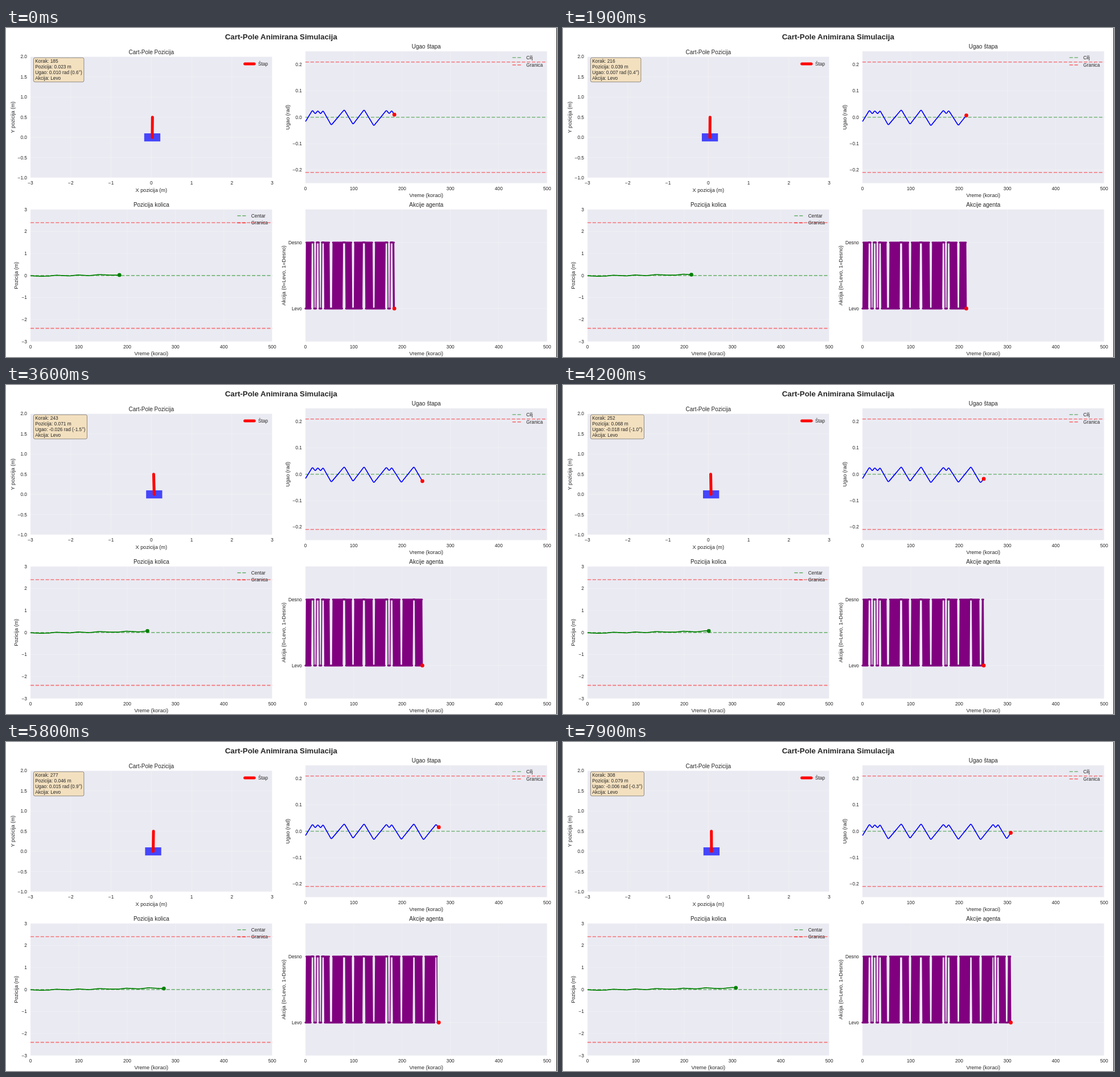
Recreate the animation shown at these times as an HTML page. Size 968x578 px, loop 8 s.

```html
<!DOCTYPE html>
<html lang="sr">
<head>
<meta charset="utf-8">
<title>Cart-Pole</title>
<style>
  html, body { margin: 0; width: 100%; height: 100%; overflow: hidden; background: #fff; }
  svg { display: block; font-family: "Liberation Sans", Arial, sans-serif; fill: #262626; }
</style>
</head>
<body>
<svg id="stage" width="968" height="578" viewBox="0 0 968 578"></svg>
<script>
const stage = document.getElementById('stage');
const LOOP = 8000, TICK = 100;
const TICK_FONT = 8.33, LABEL_FONT = 9.17, TITLE_FONT = 10, LINE = 1.67;

function add(tag, attrs, text) {
  const node = document.createElementNS('http://www.w3.org/2000/svg', tag);
  set(node, attrs);
  if (text !== undefined) node.textContent = text;
  return stage.appendChild(node);
}
function set(node, attrs) {
  for (const key in attrs) node.setAttribute(key, attrs[key]);
}
// y is the vertical middle of the text
function label(x, y, text, size = TICK_FONT, anchor = 'middle', extra = {}) {
  return add('text', { x, y: y + size * 0.36, 'font-size': size, 'text-anchor': anchor, ...extra }, text);
}
function line(x1, y1, x2, y2, stroke, width, extra = {}) {
  return add('line', { x1, y1, x2, y2, stroke, 'stroke-width': width, ...extra });
}
function dashed(x1, x2, y, color) {
  line(x1, y, x2, y, color, LINE, { 'stroke-opacity': 0.5, 'stroke-dasharray': '6.17 2.67' });
}
const curve = (stroke, width, extra = {}) =>
  add('path', { fill: 'none', stroke, 'stroke-width': width, 'stroke-linejoin': 'round', ...extra });
const dot = fill => add('circle', { r: 3.35, fill });

function axes(o) {
  const { left, top, bottom, xRange, yRange } = o, right = left + 424.6;
  const x = v => left + (v - xRange[0]) / (xRange[1] - xRange[0]) * (right - left);
  const y = v => bottom - (v - yRange[0]) / (yRange[1] - yRange[0]) * (bottom - top);
  const middle = (left + right) / 2;
  add('rect', { x: left, y: top, width: right - left, height: bottom - top, fill: '#eaeaf2' });
  const minus = s => String(s).replace('-', '\u2212');
  for (const v of o.xTicks) {
    line(x(v), top, x(v), bottom, '#fff', 0.83, { 'stroke-opacity': 0.3 });
    label(x(v), bottom + 9.3, minus(v));
  }
  for (const [v, name] of o.yTicks) {
    line(left, y(v), right, y(v), '#fff', 0.83, { 'stroke-opacity': 0.3 });
    label(left - 6, y(v), minus(name), TICK_FONT, 'end');
  }
  label(middle, top - 8.5, o.title, TITLE_FONT);
  label(middle, bottom + 21.2, o.xLabel, LABEL_FONT);
  const my = (top + bottom) / 2;
  label(o.yLabelX, my, o.yLabel, LABEL_FONT, 'middle', { transform: `rotate(-90 ${o.yLabelX} ${my})` });
  return { x, y, left, right };
}

function guides(ax, limit, name, x, rows) {
  dashed(ax.left, ax.right, ax.y(0), '#008000');
  dashed(ax.left, ax.right, ax.y(limit), '#f00');
  dashed(ax.left, ax.right, ax.y(-limit), '#f00');
  return () => [[name, '#008000'], ['Granica', '#f00']].forEach(([text, color], i) => {
    dashed(x, x + 16.7, rows[i], color);
    label(x + 24.4, rows[i], text, TICK_FONT, 'start');
  });
}

const range = (from, to, step, digits) => {
  const out = [];
  for (let v = from; v <= to + 1e-9; v += step) out.push([v, (Math.abs(v) < 1e-9 ? 0 : v).toFixed(digits)]);
  return out;
};
const steps = { xRange: [0, 500], xTicks: [0, 100, 200, 300, 400, 500], xLabel: 'Vreme (koraci)' };

label(483.3, 15.5, 'Cart-Pole Animirana Simulacija', 13.33, 'middle', { 'font-weight': 'bold' });
const scene = axes({ left: 43, top: 50.5, bottom: 263, xRange: [-3, 3], yRange: [-1, 2],
  xTicks: [-3, -2, -1, 0, 1, 2, 3], yTicks: range(-1, 2, 0.5, 1),
  title: 'Cart-Pole Pozicija', xLabel: 'X pozicija (m)', yLabel: 'Y pozicija (m)', yLabelX: 12 });
const anglePlot = axes({ ...steps, left: 526, top: 41, bottom: 272.5, yRange: [-0.25, 0.25],
  yTicks: range(-0.2, 0.2, 0.1, 1), title: 'Ugao štapa', yLabel: 'Ugao (rad)', yLabelX: 494.5 });
const cartPlot = axes({ ...steps, left: 43, top: 318.8, bottom: 550.8, yRange: [-3, 3],
  yTicks: range(-3, 3, 1, 0), title: 'Pozicija kolica', yLabel: 'Pozicija (m)', yLabelX: 18 });
const actionPlot = axes({ ...steps, left: 526, top: 318.8, bottom: 550.8, yRange: [-0.5, 1.5],
  yTicks: [[0, 'Levo'], [1, 'Desno']], title: 'Akcije agenta',
  yLabel: 'Akcija (0=Levo, 1=Desno)', yLabelX: 487.5 });

const cart = add('rect', { y: scene.y(0.1), width: 28.3, height: 14.17, fill: '#00f', 'fill-opacity': 0.7 });
const pole = line(0, scene.y(0), 0, 0, '#f00', 5, { 'stroke-linecap': 'round' });
line(419.6, 63, 436.2, 63, '#f00', 5, { 'stroke-linecap': 'round' });
label(443, 63, 'Štap', TICK_FONT, 'start');
const infoBox = add('rect', { x: 48.4, y: 52.2, height: 42.6, rx: 2.5, fill: '#f5deb3', 'fill-opacity': 0.8,
  stroke: '#000', 'stroke-opacity': 0.8, 'stroke-width': 0.5 });
const info = [58.5, 68.3, 78.1, 87.9].map(y => label(51.3, y, '', TICK_FONT, 'start'));

const angleLegend = guides(anglePlot, 0.2095, 'Cilj', 889.6, [52, 64.8]);
const angleLine = curve('#00f', LINE), angleDot = dot('#f00');
angleLegend();
const cartLegend = guides(cartPlot, 2.4, 'Centar', 406.4, [329.8, 342.4]);
const cartLine = curve('#008000', LINE), cartDot = dot('#008000');
cartLegend();
const actionLine = curve('#800080', LINE);
const actionDots = curve('#800080', 3.3, { 'stroke-linecap': 'round' });
const actionDot = dot('#f00');
add('rect', { x: 967, y: 0, width: 1, height: 578, fill: '#111' });

// Each turn: first step of a held push, pole angle and cart position at its peak.
// The pushes alternate right, left, right, ...
const turns = [
  [12, .0265, -.03], [18, .0125, -.035], [23, .025, -.035], [29, .0125, -.03], [34, .025, -.03],
  [51, -.03, .012], [78, .0285, -.02], [96, -.027, .024], [119, .0285, -.008], [139, -.0325, .042],
  [165, .0265, .016], [171, .013, .02], [176, .0255, .015], [196, -.0315, .058], [222, .0285, .028],
  [242, -.0325, .078], [268, .0265, .043], [273, .013, .046], [278, .026, .046], [296, -.029, .09]
];
const waypoints = [
  [0, -.017, -.012], [184, .01, .023], [202, -.023, .054], [229, .0147, .037], [242, -.0262, .071],
  [260, .003, .055], [290, -.003, .07], [307, -.006, .079], [309, -.001, .076],
  ...turns.map(([start, angle, pos]) => [start + 2.5, angle, pos])
].sort((a, b) => a[0] - b[0]);
const progress = [[0, 185], [11, 203], [28, 230], [36, 243], [48, 261], [67, 291], [79, 308]];

function sample(points, x, column) {
  const last = points.length - 1;
  if (x <= points[0][0]) return points[0][column];
  if (x >= points[last][0]) return points[last][column];
  const i = points.findIndex(p => p[0] > x), a = points[i - 1], b = points[i];
  return a[column] + (b[column] - a[column]) * (x - a[0]) / (b[0] - a[0]);
}
const smooth = (i, column) =>
  (sample(waypoints, i - 1, column) + sample(waypoints, i, column) + sample(waypoints, i + 1, column)) / 3;

const angles = [], positions = [], actions = [];
for (let i = 0; i < 308; i++) {
  angles.push(smooth(i, 1));
  positions.push(smooth(i, 2));
  const run = turns.findLastIndex(t => t[0] <= i);
  const held = run >= 0 && i < turns[run][0] + 6;
  actions.push(held ? 1 - run % 2 : i < 2 ? 0 : 1 - actions[i - 1]);
}

function plot(path, marker, ax, values, count) {
  const points = values.slice(0, count).map((v, i) => `${ax.x(i).toFixed(2)} ${ax.y(v).toFixed(2)}`);
  set(path, { d: 'M' + points.join('L') });
  set(marker, { cx: ax.x(count - 1), cy: ax.y(values[count - 1]) });
  return points;
}

let shown = -1;
function draw(time) {
  const count = Math.round(sample(progress, Math.floor(time % LOOP / TICK), 1));
  if (count === shown) return;
  shown = count;
  const angle = angles[count - 1], pos = positions[count - 1], x = scene.x(pos);
  set(cart, { x: x - 14.15 });
  set(pole, { x1: x, x2: scene.x(pos + 0.5 * Math.sin(angle)), y2: scene.y(0.5 * Math.cos(angle)) });
  [
    `Korak: ${count}`,
    `Pozicija: ${pos.toFixed(3)} m`,
    `Ugao: ${angle.toFixed(3)} rad (${(angle * 180 / Math.PI).toFixed(1)}°)`,
    `Akcija: ${actions[count - 1] ? 'Desno' : 'Levo'}`
  ].forEach((text, i) => { info[i].textContent = text; });
  set(infoBox, { width: info[2].getComputedTextLength() + 6 });
  plot(angleLine, angleDot, anglePlot, angles, count);
  plot(cartLine, cartDot, cartPlot, positions, count);
  const points = plot(actionLine, actionDot, actionPlot, actions, count);
  set(actionDots, { d: points.map(p => `M${p}h0`).join('') });
}

const began = performance.now();
function frame() {
  draw(performance.now() - began);
  requestAnimationFrame(frame);
}
frame();
</script>
</body>
</html>
```
